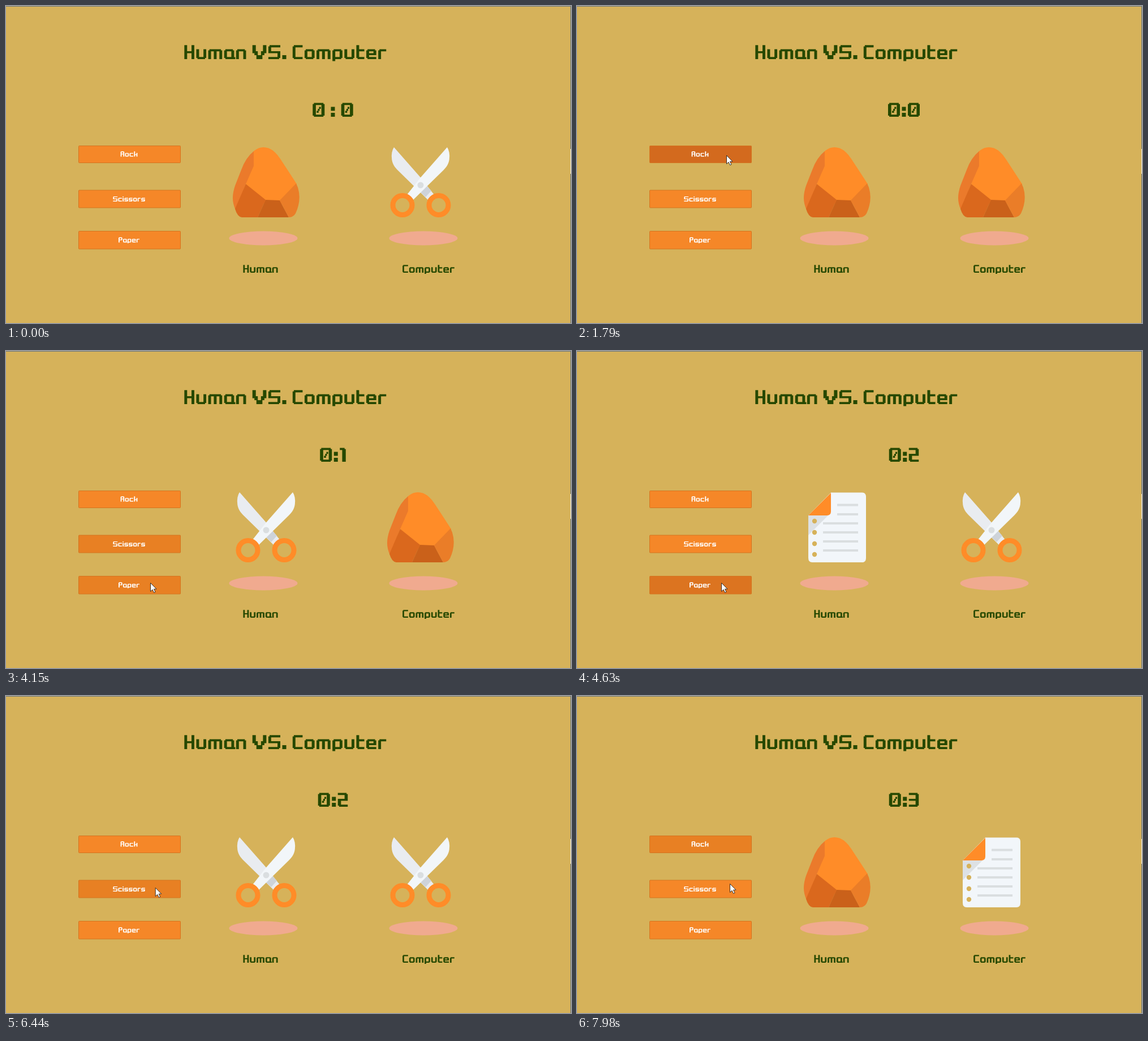
These frames come from a looping animation (999 by 561 pixels, 8 s). An HTML page:

```html
<!DOCTYPE html>
<html lang="en">
<head>
<meta charset="utf-8">
<title>Rock, Scissors, Paper</title>
<style>
  html, body { margin: 0; width: 100%; height: 100%; overflow: hidden; background: #d6b25a; }
  svg { display: block; width: 999px; height: 561px; }
  text { fill: none; text-anchor: middle; font-family: "DejaVu Sans Mono", monospace; }
  .button { stroke: #d4741f; stroke-width: 1; }
</style>
</head>
<body>
<svg viewBox="0 0 999 561">
  <defs>
    <g id="rock">
      <path fill="#ff8c28" d="M424 315L437 258Q445 250 455 250C469 250 478 260 486 272L514 315L500 350H455Z"/>
      <path fill="#eb7a2b" d="M438 257V283L424 315L406 361C399 346 400 333 405 318L416 290Q424 268 438 257Z"/>
      <path fill="#da681d" d="M424 315L459 343L445 374H417Q409 373 405 359Z"/>
      <path fill="#ca611a" d="M459 343L484 344L500 374H445Z"/>
      <path fill="#ea7d28" d="M513 314L484 344L500 374Q508 374 512 367Q523 343 516 321Z"/>
    </g>
    <g id="scissors">
      <path fill="#e9ecf0" d="M413 250Q408 258 409 268C409 279 415 286 420 291L474 344L484 334L460 303.500Z"/>
      <path fill="#ced3d9" d="M460 330L470 317L479 327L469 338Z"/>
      <path fill="#f2f6f9" d="M507 250Q512 258 511 268C511 279 505 286 500 291L446 344L436 334L460 303.500Z"/>
      <circle cx="460" cy="317" r="5.500" fill="#dadee0"/>
      <g fill="none" stroke="#ff8c28" stroke-width="9">
        <circle cx="428" cy="352.500" r="17"/>
        <circle cx="492" cy="352.500" r="17"/>
      </g>
    </g>
    <g id="paper">
      <path fill="#f2f6fa" d="M449 250.500H504Q511 250.500 511 258V366Q511 374 504 374H416Q409 374 409 366V291Z"/>
      <path fill="#dde1e4" d="M409 291H444L409 326Z"/>
      <path fill="#ff8c28" d="M449 251V284Q449 291 442 291H409Z"/>
      <path stroke="#dadee0" stroke-width="4" d="M460 272.500h37M460 289h37M435 305h62m-62 16h62m-62 16h62m-62 16h62"/>
      <path stroke="#d6b25a" stroke-width="8.400" stroke-linecap="round" d="M420 301h0m0 20h0m0 20h0m0 19h0"/>
    </g>
  </defs>

  <rect width="999" height="561" fill="#d6b25a"/>
  <path fill="#66747e" d="M0 0H999V561H998V1H0Z"/>
  <path fill="#f0eee6" d="M998 253h1v44h-1z"/>

  <g fill="#264800">
    <text x="493.800" y="94" data-unit="3.52">Human VS. Computer</text>
    <text x="578" y="196" data-unit="3.5" id="score">0 : 0</text>
    <text x="450" y="472" data-unit="1.97">Human</text>
    <text x="747" y="472" data-unit="1.95">Computer</text>
  </g>

  <g class="button">
    <rect x="128.500" y="247.500" width="180" height="30" rx="1"/>
    <rect x="128.500" y="326" width="180" height="31" rx="1"/>
    <rect x="128.500" y="398.500" width="180" height="31.500" rx="1"/>
  </g>
  <g fill="#fff">
    <text x="217.500" y="266.500" data-unit="1.32">Rock</text>
    <text x="217.500" y="346" data-unit="1.3">Scissors</text>
    <text x="217.500" y="418.500" data-unit="1.32">Paper</text>
  </g>

  <g fill="#f0aa8f">
    <ellipse cx="455" cy="411" rx="60.500" ry="12.500"/>
    <ellipse cx="738" cy="411" rx="60.500" ry="12.500"/>
  </g>
  <use id="human" href="#rock"/>
  <use id="computer" href="#scissors" x="273"/>

  <g id="cursor">
    <path fill="#fff" stroke="#222" stroke-width=".9" d="M.5.5V15.500L4 12.300L6.600 17.600L9 16.500L6.500 11.200H11Z"/>
    <circle id="halo" r="13.700" fill="#ffe600" opacity=".56"/>
  </g>
</svg>
<script>
const $ = id => document.getElementById(id);
const clamp = v => Math.max(0, Math.min(1, v));

// Blocky lettering: each glyph is [width, height, strokes, stem width].
// T M B = bars, L l R r = half stems, C = centre stem, A D = ascender, descender.
const glyphs = {
  H: [5, 7, 'LlRrM'], C: [5, 7, 'TLlB'], R: [5, 7, 'TLlRrM'], P: [5, 7, 'TLlRM'],
  S: [6, 7, 'TLMrB'], V: [7, 7, 'V'],
  a: [5, 5, 'TLlRrBa'], c: [5, 5, 'TLlB'], e: [5, 5, 'TLlRMB'], i: [1.4, 5, 'Lli'],
  k: [4.6, 5, 'ALlMRr'], m: [7, 5, 'TLlRrC'], n: [5, 5, 'TLlRr'], o: [5, 5, 'TLlRrB'],
  p: [5, 5, 'TLlRrBD'], r: [4, 5, 'TLl'], s: [5, 5, 'TLMrB'], t: [4, 5, 'ATLlB'],
  u: [5, 5, 'LlRrB'],
  0: [6, 7, 'TLlRrB/', 1.6], 1: [3, 7, 'TRr', 1.8], 2: [5, 7, 'TRMlB', 1.6], 3: [5, 7, 'TRMrB', 1.6],
  ':': [2, 5, ':'], '.': [2, 2, '.']
};

function strokeRects(part, w, h, s, parts) {
  const half = h / 2, right = w - s;
  // Corners where a bar meets a stem are notched.
  const notch = (bar, stem) => parts.includes(bar) && parts.includes(stem) ? .6 : 0;
  const bar = (y, name, leftStem, rightStem) => {
    const inset = notch(name, leftStem);
    return [[inset, y, w - inset - notch(name, rightStem), 1.1]];
  };
  const upper = (x, stem) => [[x, -h + notch('T', stem), s, half - notch('T', stem)]];
  const lower = (x, stem) => [[x, -half, s, half - notch('B', stem)]];
  switch (part) {
    case 'T': return bar(-h, 'T', 'L', 'R');
    case 'M': return [[0, -half - .5, w, 1]];
    case 'B': return bar(-1.1, 'B', 'l', 'r');
    case 'L': return upper(0, 'L');
    case 'l': return lower(0, 'l');
    case 'R': return upper(right, 'R');
    case 'r': return lower(right, 'r');
    case 'C': return [[right / 2, -h, s, h]];
    case 'A': return [[0, -7, s, 3]];
    case 'D': return [[0, -1, s, 2]];
    case 'a': return [[w - 1, -1, 1.6, 1]];
    case 'i': return [[0, -7, s, 1]];
    case '/': return [[2, -3, 1, 1], [2.6, -4, .9, 1], [3.2, -5, .9, 1]];
    case 'V': return [[0, -7, 1.7, 4], [5.3, -7, 1.7, 4], [1, -4, 1.7, 2], [4.3, -4, 1.7, 2], [2, -2, 3, 2]];
    case ':': return [[0, -5, 2, 2], [0, -2, 2, 2]];
    case '.': return [[0, -2, 2, 2]];
  }
}

function drawLettering(text) {
  const unit = +text.dataset.unit;
  let x = 0, d = '';
  for (const char of text.textContent) {
    if (char === ' ') { x += 2.2; continue; }
    const [w, h, parts, stem = 1.4] = glyphs[char];
    for (const part of parts)
      for (const [rx, ry, rw, rh] of strokeRects(part, w, h, stem, parts))
        d += `M${x + rx} ${ry}h${rw}v${rh}h${-rw}z`;
    x += w + 1;
  }
  const left = text.getAttribute('x') - (x - 1) * unit / 2;
  text.lettering.setAttribute('d', d);
  text.lettering.setAttribute('transform', `translate(${left} ${text.getAttribute('y')}) scale(${unit})`);
}

for (const text of document.querySelectorAll('text')) {
  text.setAttribute('font-size', 9 * text.dataset.unit);
  text.lettering = document.createElementNS('http://www.w3.org/2000/svg', 'path');
  text.after(text.lettering);
  drawLettering(text);
}

const LOOP = 8000;
const rounds = [
  { at: 0, human: 'rock', computer: 'scissors', score: '0 : 0' },
  { at: 1740, human: 'rock', computer: 'rock', score: '0:0' },
  { at: 3190, human: 'scissors', computer: 'rock', score: '0:1' },
  { at: 4550, human: 'paper', computer: 'scissors', score: '0:2' },
  { at: 5900, human: 'scissors', computer: 'scissors', score: '0:2' },
  { at: 7150, human: 'rock', computer: 'paper', score: '0:3' }
];
const moves = [
  { from: 230, to: 640, x: 264, y: 264 },
  { from: 2090, to: 2590, x: 262, y: 343 },
  { from: 3770, to: 4150, x: 255, y: 410 },
  { from: 5160, to: 5700, x: 263, y: 348 },
  { from: 6400, to: 6620, x: 271, y: 249 },
  { from: 7840, to: 7980, x: 270, y: 332 }
];
const buttons = [
  { presses: [1610, 7020], hovers: [[1610, 3030], [6540, LOOP]] },
  { presses: [3060, 5770], hovers: [[2520, 4430], [5400, 6480]] },
  { presses: [4420], hovers: [[4070, 5400]] }
];
const rects = document.querySelectorAll('.button rect');
const presses = buttons.flatMap(button => button.presses);

const idle = [245, 135, 40], hover = [232, 128, 35], active = [195, 90, 27];
const mix = (a, b, k) => a.map((v, i) => v + (b[i] - v) * k);

function cursorAt(t) {
  let x = 576, y = 532;
  for (const move of moves) {
    const k = clamp((t - move.from) / (move.to - move.from));
    const eased = k * k * (3 - 2 * k);
    x += (move.x - x) * eased;
    y += (move.y - y) * eased;
  }
  return [x, y];
}

function buttonColor({ presses, hovers }, t) {
  const hoverLevel = Math.max(...hovers.map(([on, off]) =>
    Math.min(clamp((t - on) / 80), 1 - clamp((t - off) / 80))));
  const pressLevel = Math.max(...presses.map(at =>
    t < at ? 0 : Math.min(clamp((t - at + 20) / 90), clamp((at + 250 - t) / 120))));
  return `rgb(${mix(mix(idle, hover, hoverLevel), active, pressLevel)})`;
}

function render(t) {
  const round = rounds.findLast(r => r.at <= t);
  $('human').setAttribute('href', '#' + round.human);
  $('computer').setAttribute('href', '#' + round.computer);
  const score = $('score');
  if (score.textContent !== round.score) {
    score.textContent = round.score;
    drawLettering(score);
  }
  buttons.forEach((button, i) => rects[i].setAttribute('fill', buttonColor(button, t)));
  $('cursor').setAttribute('transform', `translate(${cursorAt(t)})`);
  $('cursor').style.display = t < 230 ? 'none' : '';
  $('halo').style.display = presses.some(at => t >= at && t < at + 125) ? '' : 'none';
}

const start = performance.now();
function tick() {
  render((performance.now() - start) % LOOP);
  requestAnimationFrame(tick);
}
tick();
</script>
</body>
</html>
```
